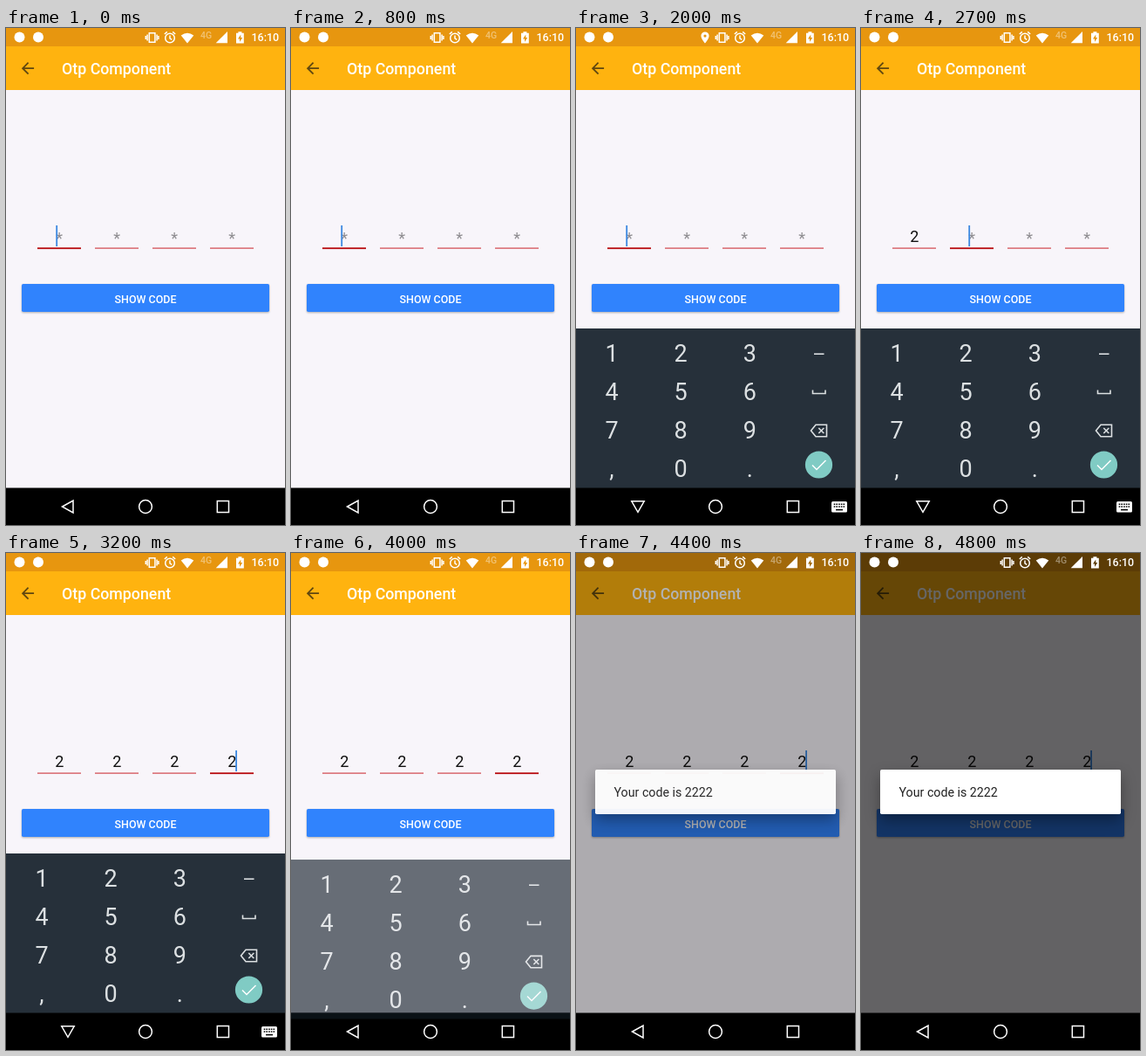
Animation, 320 px wide and 569 px high, one loop 5100 ms. Source, as an HTML page:

```html
<!DOCTYPE html>
<html lang="en">
<head>
<meta charset="utf-8">
<title>Otp Component</title>
<style>
html, body { margin: 0; width: 100%; height: 100%; overflow: hidden; background: #000; }
svg { display: block; width: 100%; height: 100%; font-family: Roboto, sans-serif; }
.medium { font-weight: 500; }
.mid { text-anchor: middle; }
.white { fill: #fff; }
.line { fill: none; stroke: #fff; stroke-width: 1.5; }
#keys { fill: #dce0e2; font-size: 27px; }
#keys .icon { fill: none; stroke: #dce0e2; stroke-width: 1.6; }
#button { filter: drop-shadow(0 1.5px 1.2px rgba(0, 0, 0, .3)); }
#dialog rect { filter: drop-shadow(0 7px 8px rgba(0, 0, 0, .35)); }
</style>
</head>
<body>
<svg viewBox="0 0 320 569">
  <rect width="320" height="569" fill="#f8f5fa"/>
  <rect width="320" height="71" fill="#ffb30f"/>
  <rect width="320" height="21" fill="#e7960f"/>
  <path transform="translate(14.3 35.5) scale(.889)" fill="#604710"
    d="M20 11H7.83l5.59-5.59L12 4l-8 8 8 8 1.41-1.41L7.83 13H20z"/>
  <text class="medium white" x="64" y="53" font-size="17.8">Otp Component</text>

  <g id="fields"></g>
  <rect id="cursor" y="226" width="1.8" height="24" fill="#3b88e0"/>

  <rect id="button" x="18" y="293" width="284" height="32" rx="1.8" fill="#3083fd"/>
  <text class="medium white mid" x="160" y="314.5" font-size="12.44">SHOW CODE</text>

  <g id="keyboard">
    <rect y="344" width="320" height="183" fill="#26303a"/>
    <g id="keys" class="mid">
      <path class="icon" stroke-width="2" d="M273 373.2h11.5"/>
      <path class="icon" d="M271.5 414.5v4h14.5v-4"/>
      <path class="icon" stroke-width="1.3" d="M275 454.3h12.5v13.4H275l-5.5-6.7zM278.3 458l6 6m0-6l-6 6"/>
    </g>
    <circle cx="278.5" cy="500" r="15.6" fill="#80cbc4"/>
    <path class="line" stroke-width="1.8" d="M271 500.5l5 5 10.5-10.5"/>
  </g>

  <rect id="scrim" width="320" height="527"/>

  <g id="status" class="white">
    <circle cx="15.5" cy="10.5" r="6"/>
    <circle cx="37" cy="10.5" r="6"/>
    <path id="pin" fill-rule="evenodd"
      d="M148 4.5a4.6 4.6 0 0 0-4.6 4.6c0 3.4 4.6 8.6 4.6 8.6s4.6-5.2 4.6-8.6A4.6 4.6 0 0 0 148 4.5zm0 3a1.6 1.6 0 1 1 0 3.2 1.6 1.6 0 0 1 0-3.2z"/>
    <path class="line" d="M164.3 5.7h6.6v10.6h-6.6zM162.1 7.5v7M173.1 7.5v7M160.3 9v4M174.9 9v4"/>
    <circle class="line" cx="188" cy="11.5" r="5.3"/>
    <path class="line" stroke-width="1.2" d="M188 8.5v3.3l2.3 1.5M181.8 7l3-2.6M194.2 7l-3-2.6"/>
    <path d="M200.7 8.6Q208 2.8 215.3 8.6L208 17.6z"/>
    <text class="mid medium" x="229.5" y="11.5" font-size="10.5" opacity=".42">4G</text>
    <path d="M254 4v13.3h-13.3z"/>
    <path fill-rule="evenodd"
      d="M264 5.8h2.4V4.3h4v1.5h2.4v11.7H264zM269.3 7.5l-3.3 5h2v3.5l3.2-5h-1.9z"/>
    <text class="medium" x="281.5" y="15" font-size="12.44">16:10</text>
  </g>

  <g id="dialog">
    <rect x="22" y="248" width="276" height="51" rx="1.8" fill="#fff"/>
    <text x="43.5" y="279" font-size="14.22" fill="#212121">Your code is 2222</text>
  </g>

  <rect y="526.5" width="320" height="42.5"/>
  <rect id="spill" y="526.5" width="320" fill="#0f1920"/>
  <path id="back" class="line"/>
  <circle class="line" cx="160" cy="548" r="7.4"/>
  <rect class="line" x="242.3" y="541.5" width="13.2" height="13"/>
  <g id="imeIcon">
    <rect class="white" x="293" y="542" width="18" height="12.5" rx="1.5"/>
    <path fill="none" stroke="#000" stroke-width="1.6" stroke-dasharray="1.6 1.1"
      d="M295.7 545.2h13M295.7 548h13"/>
    <path stroke="#000" stroke-width="1.6" d="M298 551.6h8"/>
  </g>
</svg>
<script>
const LOOP = 5100, STEP = 100;
const FIELD_X = 36, FIELD_GAP = 66, FIELD_WIDTH = 50;
const DIGIT_TIMES = [2700, 2900, 3000, 3200];
const CURSOR_TOGGLES = [300, 800, 1300, 1800, 2300, 2700, 3800, 4300];

const el = id => document.getElementById(id);
const clamp = v => Math.min(1, Math.max(0, v));
const progress = (t, from, to) => clamp((t - from) / (to - from));
const easeOut = p => 1 - (1 - p) ** 2;
const passed = (times, t) => times.filter(time => t >= time).length;
const show = (id, on) => el(id).setAttribute('visibility', on ? 'visible' : 'hidden');

function add(parent, tag, attrs) {
  const node = document.createElementNS('http://www.w3.org/2000/svg', tag);
  set(node, attrs);
  return parent.appendChild(node);
}

function set(node, attrs) {
  for (const name in attrs) node.setAttribute(name, attrs[name]);
}

const fields = DIGIT_TIMES.map((_, i) => {
  const x = FIELD_X + i * FIELD_GAP;
  return {
    text: add(el('fields'), 'text', { class: 'mid', x: x + 25.2, 'font-size': 18 }),
    line: add(el('fields'), 'rect', { x, width: FIELD_WIDTH })
  };
});

['123', '456', '789', ',0.'].forEach((row, r) => [...row].forEach((key, c) => {
  add(el('keys'), 'text', { x: 41 + c * 79.2, y: 382 + r * 44 }).textContent = key;
}));

function drawFields(t) {
  const typed = passed(DIGIT_TIMES, t);
  const active = Math.min(typed, fields.length - 1);
  fields.forEach(({ text, line }, i) => {
    const filled = i < typed;
    text.textContent = filled ? '2' : '*';
    set(text, { y: filled ? 245.3 : 246.5, fill: filled ? '#111' : '#8f8d91' });
    set(line, i === active
      ? { y: 251.3, height: 1.8, fill: '#b80c10' }
      : { y: 251.5, height: 1.2, fill: '#d2454c' });
  });
  const caret = typed === fields.length ? 263.2 : 57.3 + active * FIELD_GAP;
  el('cursor').setAttribute('x', caret);
  show('cursor', passed(CURSOR_TOGGLES, t) % 2 === 0);
}

function drawKeyboard(t) {
  const alpha = t < 3000 ? easeOut(progress(t, 1600, 1900)) : 1 - progress(t, 3900, 4220);
  const drop = (1 - alpha) * 22.5;
  set(el('keyboard'), { opacity: alpha, transform: `translate(0 ${drop})` });
  set(el('spill'), { height: drop, opacity: alpha });
  const open = t >= 1700 && t < 4000;
  show('imeIcon', open);
  el('back').setAttribute('d', open ? 'M63.8 541.8h14.4L71 554.3z' : 'M64.5 548L77 541v14z');
}

function drawDialog(t) {
  const p = progress(t, 4300, 4640);
  el('scrim').setAttribute('opacity', .6 * easeOut(p));
  el('dialog').setAttribute('opacity', t < 4400 ? 0 : .94 + .06 * progress(t, 4400, 4500));
}

function render(now) {
  const t = Math.floor(now % LOOP / STEP) * STEP;
  show('pin', t >= 1200 && t < 2700);
  drawFields(t);
  drawKeyboard(t);
  drawDialog(t);
}

const start = performance.now();
function tick() {
  render(performance.now() - start);
  requestAnimationFrame(tick);
}
tick();
</script>
</body>
</html>
```
